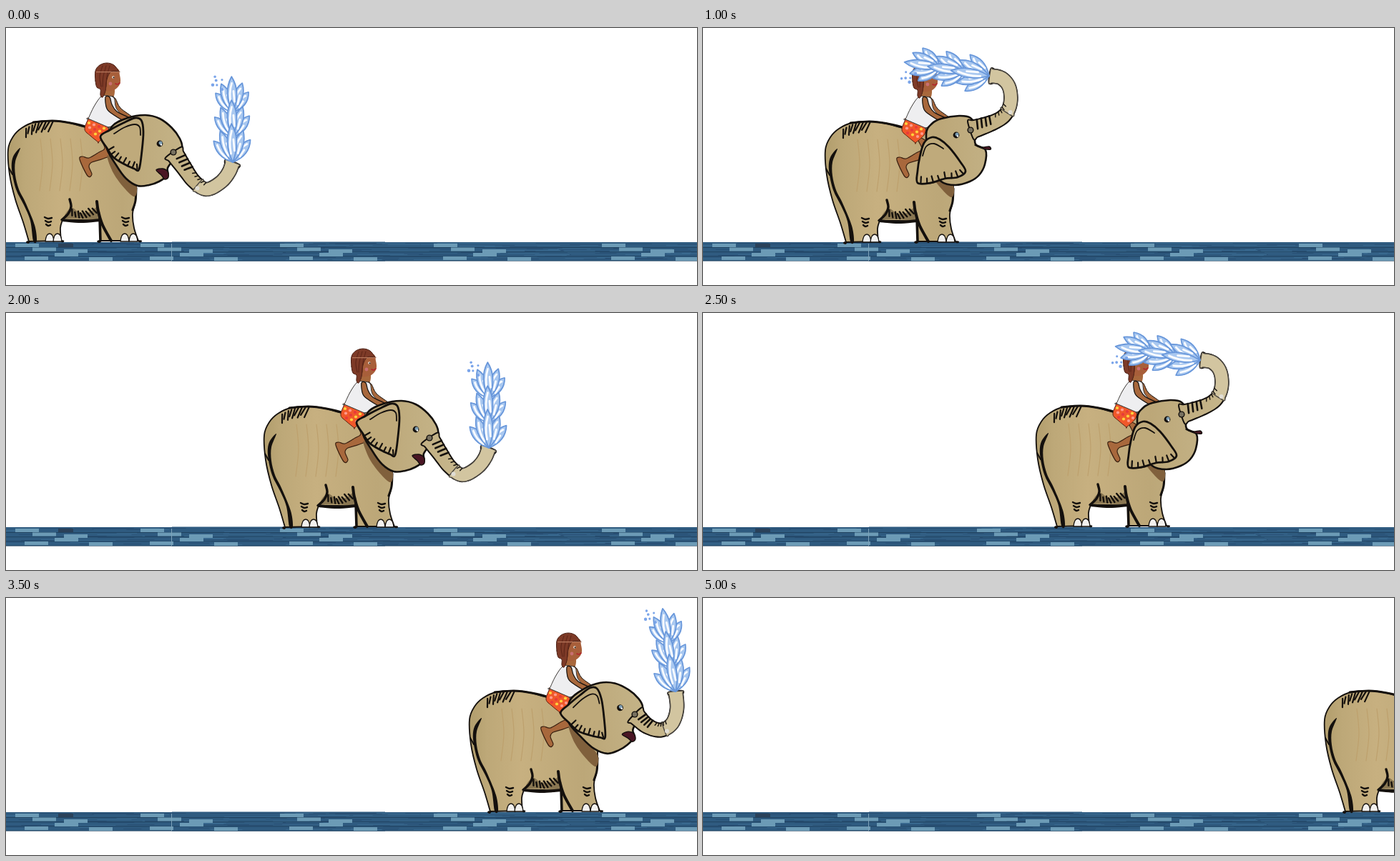
An HTML page for the animation above (5.5 s loop, 966x360 px).

```html
<!DOCTYPE html>
<html lang="en">
<head>
<meta charset="utf-8">
<title>Elephant ride</title>
<style>
  html, body { margin: 0; width: 100%; height: 100%; overflow: hidden; background: #fff; }
  svg { display: block; width: 966px; height: 360px; }
</style>
</head>
<body>
<svg id="stage" viewBox="0 0 966 360" stroke-linecap="round" stroke-linejoin="round">
  <defs>
    <linearGradient id="wood" gradientUnits="userSpaceOnUse" x1="0" y1="0" x2="270" y2="0">
      <stop offset="0" stop-color="#b09c6b"/>
      <stop offset=".1" stop-color="#bda878"/>
      <stop offset=".28" stop-color="#c7b080"/>
      <stop offset=".6" stop-color="#bca778"/>
      <stop offset="1" stop-color="#c6b68b"/>
    </linearGradient>
  </defs>
</svg>
<script>
const INK = '#14100d', WOOD = 'url(#wood)', SKIN = '#a8683c', PALE = '#d2c5a0';
const stage = document.getElementById('stage');

function add(parent, tag, attrs = {}) {
  const el = document.createElementNS('http://www.w3.org/2000/svg', tag);
  for (const k in attrs) el.setAttribute(k, attrs[k]);
  parent.appendChild(el);
  return el;
}
const group = (parent, transform = '') => add(parent, 'g', { transform });
const path = (g, d, fill, stroke = 'none', w = 1) =>
  add(g, 'path', { d, fill, stroke, 'stroke-width': w });
const dot = (g, cx, cy, r, fill) => add(g, 'circle', { cx, cy, r, fill });
const box = (g, x, y, width, height, fill) => add(g, 'rect', { x, y, width, height, fill });

// Smooth curve through points; a doubled point makes a corner.
function smooth(text, closed) {
  const pts = text.trim().split(/\s+/).map(s => s.split(',').map(Number));
  const n = pts.length;
  const at = i => closed ? pts[(i + n) % n] : pts[Math.max(0, Math.min(n - 1, i))];
  let d = 'M' + pts[0];
  for (let i = 0; i < (closed ? n : n - 1); i++) {
    const [a, b, c, e] = [at(i - 1), at(i), at(i + 1), at(i + 2)];
    const c1 = b.map((v, k) => v + (c[k] - a[k]) / 6);
    const c2 = c.map((v, k) => v - (e[k] - b[k]) / 6);
    d += `C${c1} ${c2} ${c}`;
  }
  return d + (closed ? 'Z' : '');
}
const shape = (g, pts, fill, stroke, w) => path(g, smooth(pts, true), fill, stroke, w);
const line = (g, pts, w = 2, stroke = INK) => path(g, smooth(pts), 'none', stroke, w);

// Returns (t, side) => point at fraction t, moved sideways to the left of travel.
function along(curve) {
  const total = curve.getTotalLength();
  return (t, side = 0) => {
    const p = curve.getPointAtLength(t * total);
    const a = curve.getPointAtLength(t * total - 1), b = curve.getPointAtLength(t * total + 1);
    const len = Math.hypot(b.x - a.x, b.y - a.y) || 1;
    return [p.x + (b.y - a.y) / len * side, p.y - (b.x - a.x) / len * side];
  };
}

// Short strokes standing on a curve, leaning back by lean.
function hatch(g, pts, count, len, lean = 0, w = 2) {
  const at = along(path(g, smooth(pts), 'none'));
  for (let i = 0; i < count; i++) {
    const t = (i + .5) / count;
    const [x, y] = at(t), [ex, ey] = at(t, len * (i % 2 ? .75 : 1));
    path(g, `M${x} ${y}L${ex - lean} ${ey}`, 'none', INK, w);
  }
}

function random(seed) {
  return () => (seed = (seed * 16807) % 2147483647) / 2147483647;
}

function drawGround(g) {
  const rnd = random(77);
  box(g, 0, 300, 966, 26, '#2f5b80');
  box(g, 232, 299.5, 298, 27, '#2f5b80');
  for (let i = 0; i < 180; i++)
    box(g, rnd() * 966 - 20, 301 + Math.floor(rnd() * 24), 20 + rnd() * 50, 1, i % 2 ? '#284f74' : '#38688e');
  for (let y = 307; y < 327; y += 6.2) box(g, 0, y, 966, 1, '#20425f');
  // One cluster of pale bricks, repeated at widening gaps
  const cluster = [[0, 302], [24, 307.5], [68, 310], [55, 315], [13, 320], [103, 321]];
  for (let i = 0; i < 5; i++)
    for (const [dx, y] of cluster) box(g, 13 + 165 * i + 10 * i * i + dx, y, 33, 5, '#6c9bb6');
  box(g, 73, 302, 21, 5, '#2a4159');
  box(g, 231, 302, 1, 24, '#7fa3ba');
}

function drawBody(g) {
  shape(g, `32,299 32,299 24,272 13,240 5,205 3,170 10,152 22,140 40,132 65,130 90,133
    113,139 150,137 180,165 182,222 182,222 181,242 177,260 179,280 185,298 185,298
    132,298 132,298 131,270 131,270 105,269 79,269 79,269 76,280 77,298 77,298`, WOOD, INK, 1.8);
  for (let x = 48; x < 110; x += 14)
    line(g, `${x},155 ${x + 3},190 ${x - 1},228`, 1.2, '#bda06d');
  shape(g, '91,252 104,259 117,258 128,251 131,267 105,267 82,266', '#8a7752');
  line(g, '38,132 65,130 90,133 113,139 125,148', 3);
  line(g, '182,224 181,242 177,255', 3);
  // Tail
  shape(g, `20,168 10,180 8,198 14,226 25,248 34,270 38,298 43,298 40,276 27,244 18,226 13,206 13,187`, INK);
  line(g, '4,196 9,205');
  hatch(g, '26,142 45,133 68,131', 9, -14, 7, 2.2);
  // Belly and legs
  line(g, '89,240 91,250 87,260 79,268', 3.4);
  line(g, '127,243 129,257 135,276 147,298', 4);
  line(g, '131,266 132,298', 3.6);
  line(g, '79,269 105,271 131,269', 4);
  hatch(g, '90,262 108,266 129,258', 8, 9, 3, 2.4);
  for (const x of [54, 162])
    for (let i = 0; i < 3; i++) line(g, `${x + i},${265 + 5 * i} ${x + 5},${267 + 5 * i} ${x + 10 - i},${266 + 5 * i}`, 2.4);
  for (const x of [61, 72, 166, 178])
    path(g, `M${x - 6} 299Q${x - 5} 288 ${x} 288Q${x + 5} 288 ${x + 6} 299Z`, '#f3f1ee', INK, 1.3);
}

function drawGirl(g) {
  shape(g, `131,152 144,157 160,172 136,183 120,188 116,194 120,205 114,207 103,184 107,180
    116,182 130,174 138,168`, SKIN, '#3a2010', 1.2);
  // Shorts
  shape(g, '115,127 115,127 130,133 144,138 144,138 141,149 129,160 129,160 118,151 110,142', '#f0582a', '#5a2413');
  for (let i = 0; i < 11; i++) {
    const col = i % 4, row = Math.floor(i / 4);
    dot(g, 116 + col * 7 + row, 133 + row * 6.5 + col * 2.5, 2.1, ['#ffd23c', '#ff9a8c', '#e83a3a'][i % 3]);
  }
  // Neck, far arm, top, near arm
  shape(g, '139,82 151,82 150,97 138,98', SKIN);
  shape(g, '148,97 153,99 160,112 178,126 172,130 158,120', SKIN, INK);
  shape(g, '133,96 142,95 151,98 154,112 166,131 143,139 143,139 115,127 115,127 123,110', '#eeeef0', '#393633');
  shape(g, '139,97 145,97 148,107 155,117 174,127 168,131 151,122 141,113', SKIN, INK, 1.2);
  // Head
  shape(g, '140,56 156,57 159,66 160,75 157,82 150,87 139,87 137,70', '#a85f3a');
  shape(g, '125,74 125,60 131,52 141,49 151,52 158,61 158,61 147,61 141,72 139,88 135,97 132,94 132,86 127,83',
    '#7d3a27', '#4a2015');
  for (let x = 131; x < 146; x += 5) line(g, `${x + 4},53 ${x},68 ${x - 1 + (x < 134) * 3},82`, 1, '#5a2417');
  box(g, 126, 61, 33, 1.2, '#b87a5e');
  dot(g, 150, 69, 1.8, '#f5eee6');
  dot(g, 150.6, 69.3, 1.1, '#24160f');
  dot(g, 146, 78, 2.4, '#c96f72');
  line(g, '153,78 156,79 159,77', 1.6, '#b3222c');
}

function drawFace(g, { head, ear, fold, fringe, mouth, eye: [x, y] }) {
  shape(g, head, WOOD, INK, 2.6);
  shape(g, mouth, '#4a1624', INK, 1.4);
  shape(g, ear, '#bfaa7b', INK, 2.8);
  line(g, fold, 1.8);
  hatch(g, fringe, 8, 9, 0, 2.2);
  dot(g, x, y, 4.4, INK);
  dot(g, x + 1, y - 1, 2.5, '#7f9fb4');
  dot(g, x + 2, y + 1.5, 1.3, '#fff');
}

const LEVEL = {
  head: `148,138 170,126 195,122 215,127 232,140 243,155 246,168 236,182 226,196 226,206
    214,215 200,220 184,221 168,211 154,192 140,165`,
  ear: '132,152 145,143 164,133 180,126 189,129 192,145 190,172 186,198 179,197 164,190 150,181 141,168',
  fold: '151,148 166,139 180,135 187,139 188,150',
  fringe: '141,168 150,181 164,190 179,197 187,197',
  mouth: '210,199 219,197 226,201 227,209 222,212 217,206',
  eye: [215, 162]
};
const LIFTED = {
  head: `144,148 152,133 165,126 190,122 206,125 214,140 212,155 214,163 227,170 226,190
    218,205 205,214 185,219 165,214 150,190`,
  ear: '152,152 141,160 135,180 132,199 132,216 150,216 170,210 188,208 199,200 192,187 176,166 163,155',
  fold: '139,178 144,165 155,161 168,168',
  fringe: '132,216 150,216 170,210 188,208 199,200',
  mouth: '212,163 222,166 232,165 234,169 224,168',
  eye: [186, 149]
};

// A tapering ribbon along a centre line, with stripes on its inner side.
function drawTrunk(g, centre) {
  const at = along(path(g, smooth(centre), 'none'));
  const half = t => 8.5 + 4.5 * (1 - t) ** 3 + 1.3 * t * t;
  const edge = (from, side) => Array.from({ length: 21 }, (_, i) => {
    const t = from + (1 - from) * i / 20;
    return at(t, side * half(t)).map(v => v.toFixed(1)).join();
  });
  const outline = from => [...edge(from, 1), ...edge(from, -1).reverse()].join(' ');
  shape(g, outline(0), WOOD, INK, 2);
  shape(g, outline(.45), PALE, '#4a4640', 1.4);
  const stripe = (t, depth, w) =>
    path(g, `M${at(t, half(t))}L${at(t - .02, half(t) * (1 - depth))}`, 'none', INK, w);
  for (let i = 0; i < 4; i++) stripe(.1 + i * .05, 1.1, 2.6);
  for (let i = 0; i < 5; i++) stripe(.33 + i * .05, .45, 1.4);
  const [jx, jy] = at(.47, -4), [kx, ky] = at(0);
  dot(g, jx, jy, 3, '#e0ddd4');
  dot(g, kx, ky, 4.6, INK);
  dot(g, kx, ky, 3.2, '#77705f');
}

// Three stacked fans of leaf-shaped jets
function drawSpray(parent, transform) {
  const g = group(parent, transform), rnd = random(5);
  for (let tier = 2; tier >= 0; tier--)
    for (const k of [-2, 2, -1, 1, 0]) {
      const len = 54 - 7 * Math.abs(k) - 2 * tier;
      const leaf = group(g, `translate(0 ${-35 * tier}) rotate(${k * 20 - 2}) scale(1 ${len / 54})`);
      path(leaf, 'M0 0Q-13 -30 0 -54Q13 -30 0 0Z', '#a9c8f0', '#6796da', 1.8);
      path(leaf, 'M-2 -12Q-5 -28 0 -44M3 -16L2 -32', 'none', '#fafcff', 2.8);
    }
  for (let i = 0; i < 6; i++) dot(g, -28 + rnd() * 20, -124 + rnd() * 24, 1.5 + rnd(), '#7ba5ea');
}

function drawPose(g, look, tilt, centre, spray) {
  shape(g, '142,178 165,200 182,220 180,236 167,226 150,203', '#80603c');
  drawFace(group(g, `rotate(${tilt} 175 165)`), look);
  drawTrunk(g, centre);
  drawSpray(g, spray);
}

drawGround(group(stage));
const ride = group(stage);
drawBody(ride);
drawGirl(ride);
const [forward, raised, back] = [
  [LEVEL, 0, '234,174 249,196 263,215 280,226 299,217 311,203 317,188', 'translate(317 188)'],
  [LEVEL, -12, '234,163 251,179 270,185 286,176 293,155 291,131', 'translate(291 131) rotate(-8) scale(.98)'],
  [LIFTED, 0, '206,142 236,132 254,121 262,103 260,82 249,69 233,66', 'translate(232 66) rotate(-80)']
].map(args => {
  const g = group(ride);
  drawPose(g, ...args);
  return g;
});

const CYCLE = [forward, raised, back, forward, forward, back];
const STOPS = [0, 66, 168, 257, 358, 463, 556, 645, 693, 760, 866];
const STEP_MS = 500;

function show(now) {
  const step = Math.floor(now / STEP_MS) % STOPS.length;
  const dip = Math.max(0, 2 - Math.abs(step - 3));
  ride.setAttribute('transform', `translate(${STOPS[step]} ${dip})`);
  for (const g of new Set(CYCLE))
    g.setAttribute('display', g === CYCLE[step % CYCLE.length] ? 'inline' : 'none');
}

const start = performance.now();
function tick() {
  show(performance.now() - start);
  requestAnimationFrame(tick);
}
tick();
</script>
</body>
</html>
```
